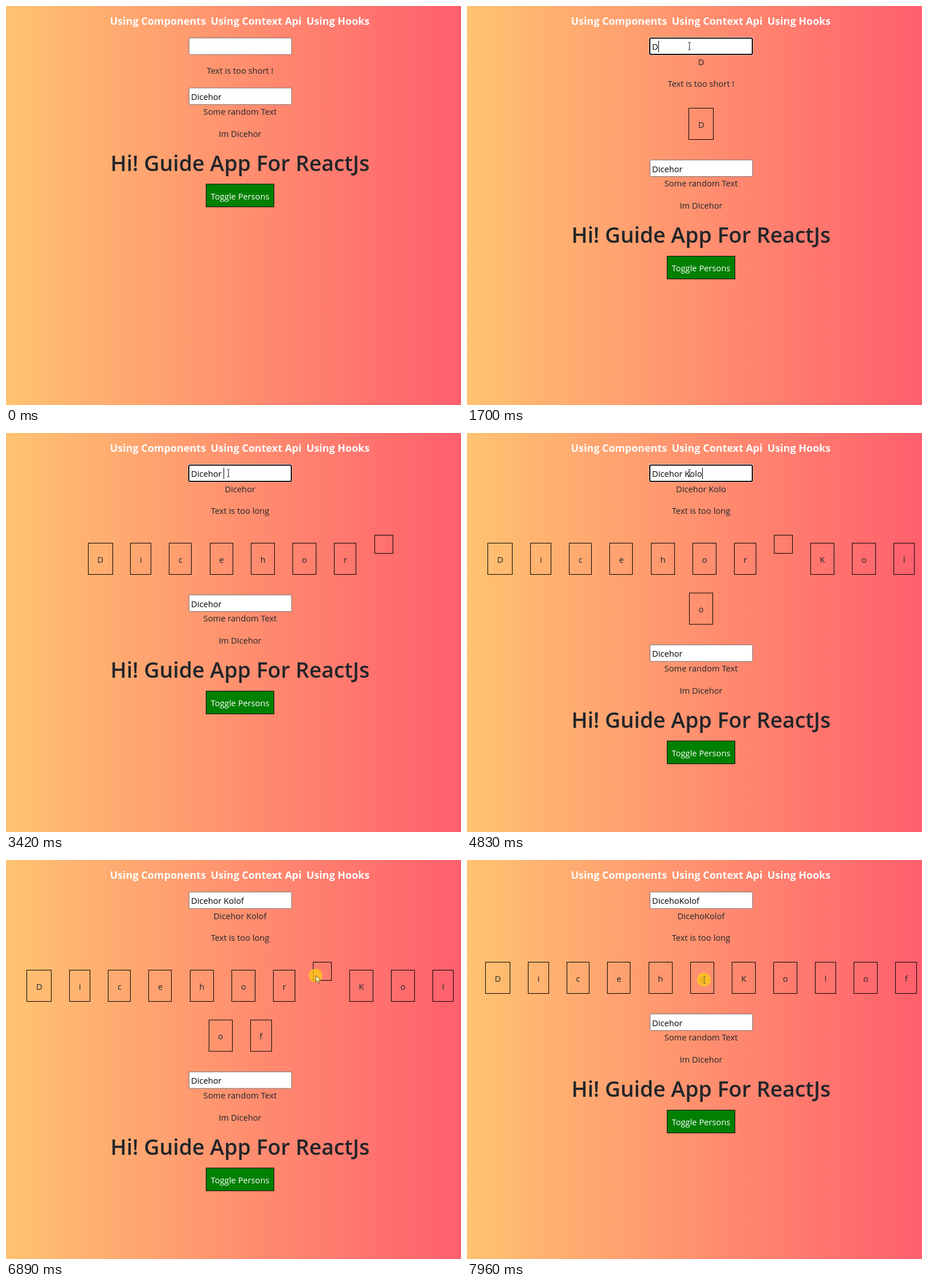
Animation of 799 by 701 pixels, one loop 8 s. Source, as an HTML page:

```html
<!DOCTYPE html>
<html lang="en">
<head>
<meta charset="utf-8">
<title>Guide App</title>
<style>
  html, body { margin: 0; width: 100%; height: 100%; overflow: hidden; }
  svg { display: block; width: 100vw; height: 100vh; }
  text { font: 14.7px "Open Sans", "Noto Sans", sans-serif; fill: #212529; white-space: pre; }
  .mid { text-anchor: middle; }
  .nav { font-size: 18px; font-weight: 700; fill: #fff; }
  .title { font-size: 37.5px; font-weight: 600; }
  .light { fill: #fff; }
  .dark { fill: #000; }
  .box { fill: none; stroke: #000; }
</style>
</head>
<body>
<svg viewBox="0 0 799 701">
  <defs>
    <linearGradient id="bg">
      <stop offset="0" stop-color="#ffc371"/>
      <stop offset="1" stop-color="#ff5f6d"/>
    </linearGradient>
  </defs>
  <rect width="799" height="701" fill="url(#bg)"/>
  <text class="nav" x="182.5" y="33">Using Components</text>
  <text class="nav" x="359.5" y="33">Using Context Api</text>
  <text class="nav" x="527.5" y="33">Using Hooks</text>
  <g id="top"></g>
  <g id="lower">
    <rect x="321.5" y="144" width="180" height="29" rx="2" fill="#fff" stroke="#767676"/>
    <text class="dark" x="325" y="165">Dicehor</text>
    <text class="mid" x="411" y="190.5">Some random Text</text>
    <text class="mid" x="411" y="229.5">Im Dicehor</text>
    <text class="mid title" x="411" y="289.5">Hi! Guide App For ReactJs</text>
    <rect x="351.5" y="312.9" width="119" height="40" fill="#008000" stroke="#000"/>
    <text class="mid light" x="411" y="339.6">Toggle Persons</text>
  </g>
  <g id="pointer"></g>
</svg>
<script>
const LOOP = 8000, MID = 411.3, GAP = 31, ROW_MAX = 765;
const NAME = "Dicehor Kolof";
const KEY_TIMES = [1700, 1870, 2170, 2340, 2490, 2720, 2890, 3420, 3740, 3970, 4520, 4830, 4980];
const FOCUS = 930, BLUR = 6890, DROP_SPACE = 7060, DROP_LETTER = 7620;
const PATH = [
  [70, 671, 502], [145, 510, 320], [220, 345, 153], [450, 345, 153], [1010, 390.5, 70],
  [5300, 390.5, 70], [5380, 405, 47], [5700, 29, 202], [6100, 381, 200], [6500, 561, 203],
  [6720, 543.5, 203], [7200, 543.5, 203], [7520, 482, 208], [7660, 482, 208],
  [7820, 425, 210], [7960, 416, 210]
];

const byId = id => document.getElementById(id);
const pen = document.createElement("canvas").getContext("2d");
pen.font = '14.7px "Open Sans", "Noto Sans", sans-serif';
const widthOf = s => pen.measureText(s).width;
const label = (s, x, y, cls) => `<text class="${cls}" x="${x}" y="${y}">${s}</text>`;
const frame = (x, y, w, h) => `<rect class="box" x="${x}" y="${y}" width="${w}" height="${h}"/>`;

function typedAt(t) {
  if (t >= DROP_LETTER) return NAME.slice(0, 6) + NAME.slice(8);
  if (t >= DROP_SPACE) return NAME.replace(" ", "");
  return NAME.slice(0, KEY_TIMES.filter(k => k <= t).length);
}

function caretOn(t) {
  if (t < FOCUS || t >= BLUR) return false;
  const last = KEY_TIMES.filter(k => k <= t).pop() ?? FOCUS;
  return Math.floor((t - last) / 535) % 2 === 0;
}

function input(t, text) {
  const focused = t >= FOCUS && t < BLUR;
  let out = focused
    ? `<rect x="319.5" y="54.5" width="183" height="32" rx="3" fill="#fff" opacity=".7"/>
       <rect x="321" y="56.5" width="180" height="28.5" rx="2" fill="#fff" stroke="#101010" stroke-width="2"/>`
    : `<rect x="321.5" y="56.2" width="180" height="29" rx="2" fill="#fff" stroke="#767676"/>`;
  out += label(text, 325, 77, "dark");
  if (caretOn(t)) out += `<rect x="${Math.round(325 + widthOf(text))}" y="61" width="1" height="20"/>`;
  return out;
}

// Centred, wrapping rows of letter boxes; an empty box hangs from the text baseline.
function cards(text) {
  const rows = [];
  for (const ch of text) {
    const w = ch === " " ? 32.5 : widthOf(ch) + 33.2;
    let row = rows[rows.length - 1];
    if (!row || row.w + GAP + w > ROW_MAX) rows.push(row = { w: -GAP, items: [] });
    row.items.push([ch, w]);
    row.w += GAP + w;
  }
  let out = "", y = 179.5;
  for (const row of rows) {
    let x = MID - row.w / 2;
    const spaced = row.items.some(([ch]) => ch === " ");
    const top = y + (spaced ? 14 : 0);
    for (const [ch, w] of row.items) {
      const left = Math.round(x) + .5, side = Math.round(w - 1);
      out += ch === " "
        ? frame(left, y, 32, 32)
        : frame(left, top, side, 55) + label(ch, x + w / 2, top + 34, "mid");
      x += w + GAP;
    }
    y = top + 87.6;
  }
  return { out, shift: rows.length ? y - 140.5 : 0 };
}

function pointerAt(t) {
  const q = Math.floor((t - 40) / 80) * 80 + 40;
  let i = PATH.findIndex(p => p[0] > q);
  if (i === 0) return PATH[0].slice(1);
  if (i < 0) return PATH[PATH.length - 1].slice(1);
  const [t0, x0, y0] = PATH[i - 1], [t1, x1, y1] = PATH[i];
  const k = (q - t0) / (t1 - t0);
  return [x0 + (x1 - x0) * k, y0 + (y1 - y0) * k];
}

function pointer(t) {
  if (t < 70) return "";
  const [x, y] = pointerAt(t);
  const halo = t < 1010 || t >= 5300;
  const beam = (t >= 220 && t < 5380) || t >= 7960;
  let out = halo ? `<circle cx="${x}" cy="${y}" r="12" fill="#ffcc14" opacity=".75"/>` : "";
  out += beam
    ? `<path transform="translate(${x + (halo ? 1 : 0)} ${y + .5})" fill="none"
        stroke="${halo ? "#77703c" : "#222"}" d="M-2.5-6.5H-1L0-5.5L1-6.5H2.5M0-5.5V5.5M-2.5 6.5H-1L0 5.5L1 6.5H2.5"/>`
    : `<path transform="translate(${x + .5} ${y})" fill="#fff3b8" stroke="#4a3b20" stroke-width=".8"
        d="M0 0V12L2.8 9.4L4.7 13.8L6.7 13L4.8 8.6H8.6Z"/>`;
  return out;
}

function draw(t) {
  const text = typedAt(t), grid = cards(text);
  const note = text.length > 5 ? "Text is too long" : "Text is too short !";
  byId("top").innerHTML = input(t, text) + label(text.trim(), 411, 103.5, "mid")
    + label(note, 411, text ? 142.3 : 119.3, "mid") + grid.out;
  byId("lower").setAttribute("transform", `translate(0 ${grid.shift})`);
  byId("pointer").innerHTML = pointer(t);
}

const start = performance.now();
function tick() {
  draw((performance.now() - start) % LOOP);
  requestAnimationFrame(tick);
}
tick();
</script>
</body>
</html>
```
